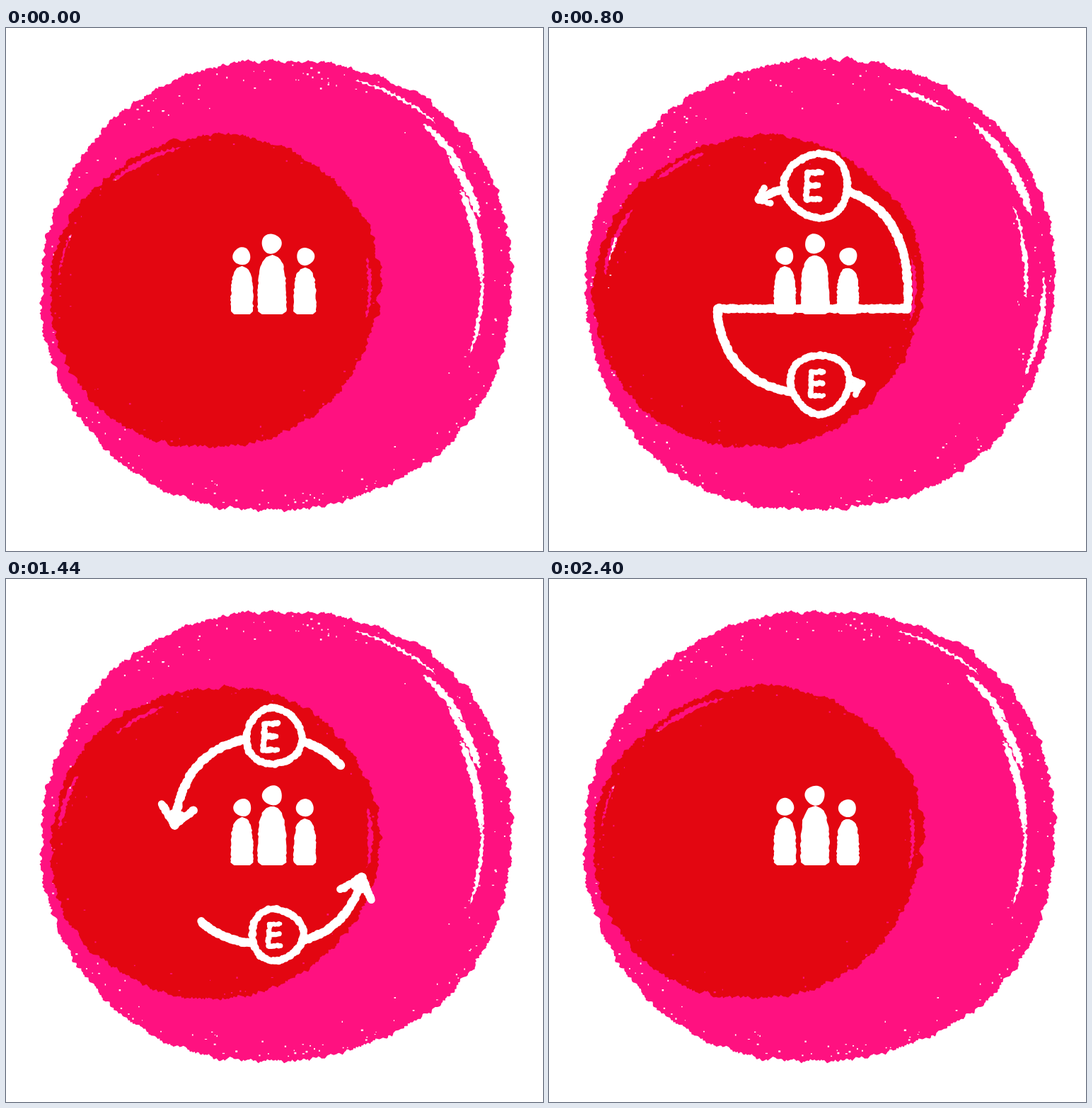
Animation of 759 by 738 pixels, one loop 2480 ms. Source, as an HTML page with a canvas:

```html
<!DOCTYPE html>
<html lang="en">
<head>
<meta charset="utf-8">
<title>Circular exchange</title>
<style>
html, body { margin: 0; width: 100%; height: 100%; overflow: hidden; background: #fff; }
canvas { display: block; }
</style>
</head>
<body>
<canvas id="stage" width="759" height="738"></canvas>
<script>
const W = 759, H = 738, LOOP = 2480, WASH_STEP = 120, INK_STEP = 80;
const { PI, sin, cos, abs, min, max, sign, sqrt, ceil, floor, hypot, atan2 } = Math;
const stage = document.getElementById('stage').getContext('2d');

function random(seed) {
  let s = seed * 2654435761 >>> 0;
  return () => {
    s = s + 0x6D2B79F5 | 0;
    let v = Math.imul(s ^ s >>> 15, 1 | s);
    v = v + Math.imul(v ^ v >>> 7, 61 | v) ^ v;
    return ((v ^ v >>> 14) >>> 0) / 4294967296;
  };
}

// Linear track: [time, value, time, value, ...]
function track(t, keys) {
  if (t <= keys[0]) return keys[1];
  for (let i = 2; i < keys.length; i += 2) {
    if (t <= keys[i]) {
      const f = (t - keys[i - 2]) / (keys[i] - keys[i - 2]);
      return keys[i - 1] + (keys[i + 1] - keys[i - 1]) * f;
    }
  }
  return keys[keys.length - 1];
}

function fillPolygon(g, points) {
  g.beginPath();
  points.forEach(([x, y]) => g.lineTo(x, y));
  g.fill();
}

// Rough painted disc; dry-brush scratches are cut out so the layer below shows.
function wash({ color, x, y, radius, scratches, flecks }, seed) {
  const canvas = document.createElement('canvas');
  canvas.width = W;
  canvas.height = H;
  const g = canvas.getContext('2d'), rnd = random(seed);
  const at = (a, r) => [x + r * cos(a), y + r * sin(a)];
  const outline = [], steps = floor(radius(0) * 3), phase = rnd() * 2 * PI;
  let drift = 0;
  for (let i = 0; i < steps; i++) {
    const a = i / steps * 2 * PI;
    drift = drift * 0.7 + (rnd() - 0.5) * 4.5;
    outline.push(at(a, radius(a) + drift + 1.5 * cos(5 * a + phase)));
  }
  g.fillStyle = color;
  fillPolygon(g, outline);

  g.globalCompositeOperation = 'destination-out';
  for (const { start, sweep, depth, width } of scratches(rnd)) {
    const outer = [], inner = [], count = ceil(sweep * radius(0) / 3);
    for (let i = 0; i <= count; i++) {
      const a = start + sweep * i / count, r = radius(a) * depth;
      const half = width / 2 * sqrt(sin(PI * i / count) + 0.02);
      outer.push(at(a, r + half + (rnd() - 0.5) * 4));
      inner.unshift(at(a, r - half + (rnd() - 0.5) * 4));
    }
    fillPolygon(g, outer.concat(inner));
  }
  for (let i = 0; i < flecks; i++) {
    const a = rnd() * 2 * PI, r = radius(a) * (0.98 - 0.2 * rnd() * rnd());
    g.fillRect(...at(a, r), 1 + rnd() * 2.2, 1 + rnd() * 1.6);
  }
  return canvas;
}

const pink = {
  color: '#ff1180', x: 380, y: 365, flecks: 150,
  radius: a => 329 + 4 * cos(a + 0.52) - 8 * cos(2 * a - 2.62) - 4 * cos(4 * a),
  // A run of streaks down the upper right, and one on the far left
  scratches: rnd => [-1.25, -0.9, -0.75, -0.5, -0.15, 2.95].map(start => ({
    start: start + rnd() * 0.15, sweep: 0.25 + rnd() * 0.25,
    depth: 0.86 + rnd() * 0.1, width: 3 + rnd() * 9
  }))
};
const red = {
  color: '#e30611', x: 295, y: 372, flecks: 40,
  radius: a => 227 + 7 * cos(2 * a + 0.52),
  scratches: rnd => [3.2, 3.95, -0.3].map(start => ({
    start: start + rnd() * 0.1, sweep: 0.25 + rnd() * 0.3,
    depth: 0.93 + rnd() * 0.03, width: 2 + rnd() * 6
  }))
};
const pinks = [1, 2, 3, 4].map(seed => wash(pink, seed));
const reds = [5, 6, 7, 8, 9].map(seed => wash(red, seed));

// Chalk line: a row of slightly uneven dabs.
function chalk(rnd, points, width) {
  stage.beginPath();
  for (const [px, py] of points) {
    const x = px + (rnd() - 0.5) * 1.6, y = py + (rnd() - 0.5) * 1.6;
    const r = max(0.1, width / 2 + (rnd() - 0.5) * 1.4);
    stage.moveTo(x + r, y);
    stage.arc(x, y, r, 0, 7);
  }
  stage.fill();
}

function segment(x1, y1, x2, y2) {
  const n = ceil(hypot(x2 - x1, y2 - y1) / 2) || 1;
  return Array.from({ length: n + 1 }, (_, i) => [x1 + (x2 - x1) * i / n, y1 + (y2 - y1) * i / n]);
}

function circle(rnd, x, y, r) {
  const n = max(8, ceil(r * 3)), tilt = rnd() * 6, wobble = 0.02 + rnd() * 0.03;
  return Array.from({ length: n }, (_, i) => {
    const a = i / n * 2 * PI, d = r * (1 + wobble * sin(3 * a + tilt));
    return [x + d * cos(a), y + d * sin(a)];
  });
}

function person(rnd, x, headY, headR, top, half) {
  const jitter = () => (rnd() - 0.5) * 1.8, bottom = 400;
  fillPolygon(stage, circle(rnd, x + jitter(), headY + jitter(), headR));
  const left = [], right = [];
  for (let i = 0; i <= 24; i++) {
    const u = i / 24, y = bottom - (bottom - top) * u;
    const w = half * sqrt(1 - u ** 5) * (1 - 0.06 * u);
    left.push([x - w + jitter(), y]);
    right.unshift([x + w + jitter(), y]);
  }
  fillPolygon(stage, [...left, ...right, [x + half * 0.7, bottom + 4], [x - half * 0.7, bottom + 4]]);
}

// Route of an arrow: out along the base line, then round a slightly square ellipse.
const BASE = 135;
const bulge = v => sign(v) * abs(v) ** 0.85;
function route(d, side) {
  if (d < BASE) return [372 + side * d, 396];
  const a = (side > 0 ? 0.1 : PI - 0.1) - (d - BASE) / 140;
  return [372 + BASE * bulge(cos(a)), 376 + (sin(a) < 0 ? 152 : 139) * bulge(sin(a))];
}

function arrow(rnd, side, tail, head, size, coin) {
  if (head - tail < 2) return;
  const points = [];
  for (let d = tail; d <= head; d += 2) {
    const p = route(d, side);
    if (hypot(p[0] - coin.x, p[1] - coin.y) > coin.r) points.push(p);
  }
  chalk(rnd, points, 12);
  if (size <= 0) return;
  const [x, y] = route(head, side), [bx, by] = route(head - 30, side);
  const back = atan2(by - y, bx - x);
  for (const turn of [-0.72, -0.36, 0.36, 0.72]) {
    const a = back + turn, l = 48 * abs(turn) * size;
    chalk(rnd, segment(x, y, x + l * cos(a), y + l * sin(a)), 6 + 5 * size);
  }
}

function drawCoin(rnd, { x, y, r }, scale) {
  if (r <= 0) return;
  chalk(rnd, circle(rnd, x, y, r), min(10, 6 + r));
  const s = scale * min(1, max(0, (r - 16) / 22));
  if (s <= 0) return;
  const bars = [[-13, -18, -15, 19], [-13, -18, 6, -19], [-13, 0, 3, -1], [-15, 19, 5, 19]];
  for (const bar of bars) {
    const [x1, y1, x2, y2] = bar.map(v => v * s);
    chalk(rnd, segment(x + x1, y + y1, x + x2, y + y2), 8 * s);
  }
}

function draw(time) {
  const slot = floor(time / WASH_STEP), step = floor(time / INK_STEP);
  const t = step * INK_STEP, rnd = random(step + 20);
  stage.fillStyle = '#fff';
  stage.fillRect(0, 0, W, H);
  stage.drawImage(pinks[slot % pinks.length], 0, 0);
  stage.drawImage(reds[slot % reds.length], 0, 0);

  person(rnd, 333.5, 322, 12.5, 336, 16);
  person(rnd, 376, 305, 14, 320, 20.5);
  person(rnd, 422.5, 323, 12.5, 338, 16);

  const r = track(t, [400, 0, 560, 11.5, 800, 45, 1400, 45, 1680, 5, 1760, 0]);
  const upper = { x: 378.5, y: 222.5, r }, lower = { x: 383, y: 502, r: r > 12 ? r * 0.92 : r };
  const size = track(t, [720, 0, 880, 1, 1700, 1, 2080, 0.62, 2320, 0]);
  const tail = track(t, [890, 0, 960, 28, 1280, 166, 1680, 396, 2080, 638, 2320, 790]);
  const head = track(t, [0, 0, 560, 312, 960, 531, 1120, 568, 1700, 570, 2080, 699, 2320, 790]);
  arrow(rnd, 1, tail, head, size, upper);
  arrow(rnd, -1, tail * 0.92, head * 0.92, size, lower);
  drawCoin(rnd, upper, 1);
  drawCoin(rnd, lower, 0.9);
}

function frame() {
  draw(performance.now() % LOOP);
  requestAnimationFrame(frame);
}
frame();
</script>
</body>
</html>
```
